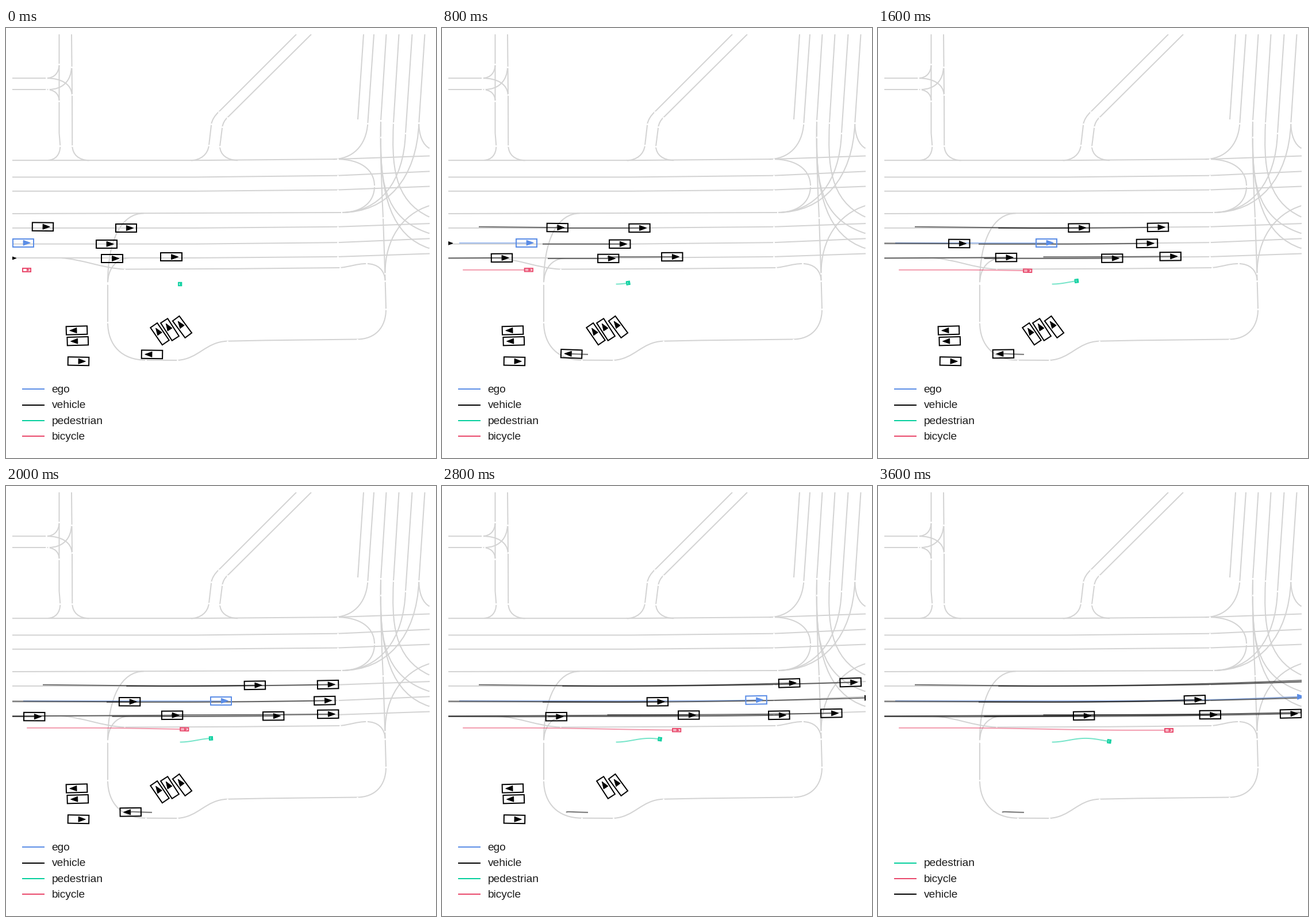
Recreate the animation shown at these times as a matplotlib script. Size 748 by 748 pixels, loop 3800 ms.

```python
import numpy as np
import matplotlib.pyplot as plt
from matplotlib.animation import FuncAnimation
from matplotlib.patches import PathPatch, Polygon, Rectangle
from matplotlib.path import Path

SIZE, DPI = 748, 100
LO, HI = 11, 737
FRAMES, STEP = 19, 200
PX = 72 / DPI
COLORS = {"ego": "#5b8de6", "vehicle": "black",
          "pedestrian": "#05cf9d", "bicycle": "#e9496c"}

fig = plt.figure(figsize=(SIZE / DPI, SIZE / DPI), dpi=DPI, facecolor="white")
ax = fig.add_axes([0, 0, 1, 1])
ax.set(xlim=(0, SIZE), ylim=(SIZE, 0))
ax.axis("off")
view = Rectangle((LO, LO), HI - LO, HI - LO, transform=ax.transData)


def road(*steps, z=1):
    """Steps: point, (corner, end) of a bend, or a cubic; bends end in a small gap."""
    verts, codes, gaps = [steps[0]], [Path.MOVETO], []
    for step in steps[1:]:
        pts = np.reshape(step, (-1, 2)).astype(float)
        start = np.array(verts[-1])
        if len(pts) == 2:
            corner, end = pts
            pts = np.array([start + 0.62 * (corner - start),
                            end + 0.62 * (corner - end), end])
        if len(pts) > 1:
            gaps += [start, pts[-1]]
        verts += pts.tolist()
        codes += [Path.LINETO] if len(pts) == 1 else [Path.CURVE4] * 3
    patch = PathPatch(Path(verts, codes), fill=False, ec="#d3d3d3", lw=2 * PX,
                      capstyle="butt", zorder=z)
    ax.add_patch(patch)
    patch.set_clip_path(view)
    for x, y in gaps:
        gap(x, y, z + 0.1)


def gap(x, y, z):
    ax.plot(x, y, "o", ms=3 * PX, mew=0, color="white", zorder=z)


# long lanes, rising towards the right edge
for y, drop in [(230.2, 7.7), (259.4, 10), (283.8, 8.3),
                (347.9, 7.8), (375.7, 9.4), (399.9, 7.4)]:
    road((LO, y), (330, y), (577, y - 0.27 * drop), (HI, y - drop), z=1.5)
    gap(577, y - 0.27 * drop, 1.6)
road((LO, 323), (250, 322.2), (583, 321), z=1.5)

# crossing at the top left
road((92.5, 11), (92.5, 183), (94.3, 205), (94.3, 230, 72, 230))
road((114, 11), (115, 116), (115.3, 205), (116, 230, 145, 230.3))
for y, end in [(87.3, 63), (107, 127)]:
    road((LO, y), (70, y), (92.5, y, 92.5, end))
road((70, 87.3), (113, 87, 114.7, 116))
road((114, 68), (113, 107, 74, 107))

# slanted pair
road((505, 11), (370, 146), (359, 156, 357.3, 167), (353, 204), (350, 230, 320, 230.5))
road((531, 11), (385, 156), (378, 162, 376.3, 172), (372, 206), (373, 230, 404, 230.3))

# loop below the lanes
road((240, 322.4), (177, 322, 177, 443), (177, 512), (177, 577.5, 243, 577.7),
     (298, 578), (335, 576, 347, 546, 385, 544.7), (450, 543.4), (611, 541.5),
     (661, 541, 661, 489), (659.3, 427))
road((177, 445), (177, 401, 216, 400))
road((95, 400), (132, 402, 168, 418, 206, 419.6), (400, 418.8), (581, 417),
     (600, 415, 610, 410, 627, 410), (659, 410, 659.5, 440))

# right side
road((622, 11), (612, 159))
road((640, 11), (629.3, 166), (625, 228, 568, 228.3))
road((575, 228.2), (641, 228, 641, 275), (641, 321, 583, 321))
road((661.5, 11), (652, 161), (651, 235, 654, 285, 656, 330), (659.3, 427))
road((652, 161), (650, 262, 653, 330, 737, 357.5))
road((652, 190), (651, 290, 670, 362, 737, 383.5))
road((683.5, 11), (674, 165), (671, 235, 673, 300, 737, 329))
road((706.5, 11), (695, 183), (690, 321, 583, 321))
road((728.5, 11), (718.3, 165), (712, 321, 583, 321))
road((718.3, 165), (718, 200, 737, 209.5))
road((737, 309), (659, 333, 659.5, 427))


def spline(t, keys, vals):
    """Smooth cubic through the key values."""
    keys, vals = np.asarray(keys, float), np.asarray(vals, float)
    slope = np.gradient(vals, keys, edge_order=2)
    i = np.clip(np.searchsorted(keys, t, "right") - 1, 0, len(keys) - 2)
    h = keys[i + 1] - keys[i]
    u = (t - keys[i]) / h
    return ((1 + 2 * u) * (1 - u) ** 2 * vals[i] + u * (1 - u) ** 2 * h * slope[i]
            + u * u * (3 - 2 * u) * vals[i + 1] + u * u * (u - 1) * h * slope[i + 1])


def drive(xs, y, bend=300, rise=3.8e-5, drift=0.0):
    """Follow a lane that drifts up to the bend and then curves upwards."""
    def path(t):
        x = spline(t, [0, 4, 8, 12, 18], xs)
        past = x - bend
        return x, y + drift * np.minimum(past, 0) - rise * np.maximum(past, 0) ** 2
    return path


def cycle(t):
    x = spline(t, [0, 4, 8, 12, 18], [36.2, 150.8, 260.2, 359, 506])
    u = np.clip((x - 140) / 300, 0, 1)
    return x, 420.8 + 4 * u * u * (3 - 2 * u)


def walk(t):
    x = 302.7 + 5.2 * t + 0.018 * t ** 2
    return x, 442.2 - 3.3 * np.cos((x - 361) / 18.5)


def stop(t):
    return 215.5 + 38.5 * np.exp(-t / 2.9), 567.8 - 1.1 * np.sin(np.pi * t / 12)


class Agent:
    def __init__(self, kind, path, size=(36.4, 14.4), turn=None, last=FRAMES):
        self.path, self.size, self.turn, self.last = path, size, turn, last
        color = COLORS[kind]
        z = 2 if kind == "ego" else 3
        self.trail, = ax.plot([], [], color=color, lw=2 * PX, alpha=0.55,
                              solid_capstyle="butt", zorder=z)
        self.box = Polygon([(0, 0)] * 4, fill=False, ec=color, lw=2 * PX, zorder=z + 2)
        self.head = Polygon([(0, 0)] * 3, fc=color, ec=color, lw=0.8 * PX, zorder=z + 2)
        for p in (self.box, self.head):
            ax.add_patch(p)
        for a in (self.trail, self.box, self.head):
            a.set_clip_path(view)

    def pos(self, t):
        return np.array(self.path(np.asarray(t, float)))

    def angle(self, t):
        if self.turn:
            return np.radians(self.turn(t))
        dx, dy = self.pos(t + 0.5) - self.pos(t - 0.5)
        return np.arctan2(dy, dx)

    def update(self, t):
        alive = t < self.last
        end = min(t, self.last - 1)
        trail = self.pos(np.linspace(0, end, 4 * end + 1))
        self.trail.set_data(*trail)
        self.trail.set_visible(np.ptp(trail[0]) > 1)
        a, c = self.angle(t), self.pos(t)
        rot = np.array([[np.cos(a), np.sin(a)], [-np.sin(a), np.cos(a)]])
        w, h = self.size
        corners = np.array([(-1, -1), (1, -1), (1, 1), (-1, 1)]) * (w / 2, h / 2) @ rot + c
        self.box.set_xy(corners)
        self.head.set_xy(np.array([(0, -1), (1, 0), (0, 1)]) * (0.34 * w, 0.32 * h) @ rot + c)
        inside = corners.min() > LO - 0.5 and corners.max() < HI + 0.5
        self.box.set_visible(alive and inside)
        self.head.set_visible(alive)


def car(xs, y, **lane):
    return Agent("vehicle", drive(xs, y, **lane))


def parked(x, y, deg, last=16):
    return Agent("vehicle", lambda t: (x + 0 * t, y + 0 * t),
                 turn=lambda t: deg, last=last)


ego = Agent("ego", drive([30, 147, 293, 459.3, 729.5], 373.7, bend=400, rise=6.4e-5))
lead = car([64, 200.8, 349.5, 519, 775], 347.9, bend=270, rise=4.5e-5, drift=0.0105)
agents = [
    ego, lead,
    car([209.3, 343.5, 487, 634.5, 868], 348),
    car([175, 309.3, 468, 644, 925], 375.8),
    car([184.5, 289.3, 407.3, 524.2, 718], 400.9, rise=2.7e-5),
    car([287.5, 400.3, 508.7, 614.7, 822], 398.2, rise=2e-5),
    car([5.5, 104, 223, 358.3, 577.8], 398.7, rise=1e-5, drift=-0.006),
    car([-118, 6.5, 141.3, 293, 551], 375.6, rise=6e-5, drift=0.004),
    car([-290, -158, -22, 122.8, 358.2], 401.4, bend=120, rise=3e-5, drift=0.004),
    Agent("vehicle", stop, last=13,
          turn=lambda t: 180.7 + 1.6 * np.sin(np.pi * t / 6)),
    Agent("pedestrian", walk, size=(5.2, 5.4)),
    Agent("bicycle", cycle, size=(14.2, 5.4)),
    parked(123, 526, 178.5), parked(124.8, 544.7, 178.5), parked(126, 579.7, 1),
    parked(267.5, 532.2, -124.5, last=14),
    parked(285, 524.6, -122.8), parked(306.5, 520, -126.5),
]

rows = []
for y in 628.3 + 27.3 * np.arange(4):
    line, = ax.plot([28, 67], [round(y)] * 2, lw=2 * PX, solid_capstyle="butt")
    label = ax.text(79.6, y + 5.7, "", family="Liberation Sans", size=19.1 * PX,
                    color="#1a1a1a", va="baseline")
    rows.append((line, label))


def update(n):
    for a in agents:
        a.update(n)
    names = ["ego", "pedestrian", "bicycle"]
    names.insert(1 if lead.box.get_visible() else 3, "vehicle")
    for name, (line, label) in zip(names, rows):
        shown = name != "ego" or ego.box.get_visible()
        line.set_color(COLORS[name])
        label.set_text(name)
        line.set_visible(shown)
        label.set_visible(shown)
    return []


anim = FuncAnimation(fig, update, frames=FRAMES, interval=STEP, repeat=True,
                     repeat_delay=0, blit=False)
plt.show()
```
